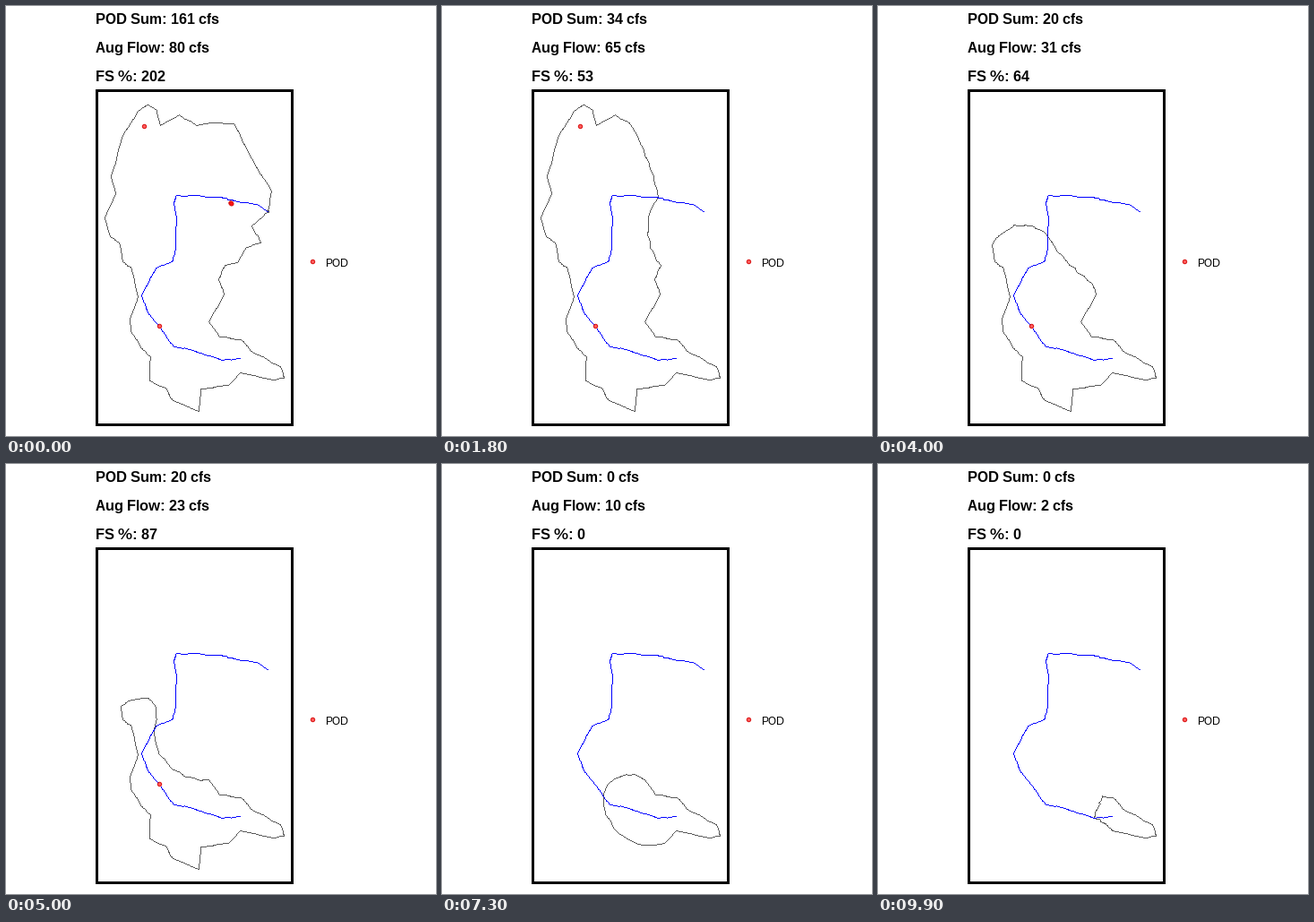
A matplotlib script for the animation above (10 s loop, 480x480 px).

```python
import matplotlib.pyplot as plt
import numpy as np
from matplotlib.animation import FuncAnimation
from matplotlib.patches import Circle, Rectangle

plt.rcParams["text.hinting"] = "default"
plt.rcParams["text.hinting_factor"] = 1

SIZE, FRAMES = 480, 100
PX = 0.72  # points per pixel at 100 dpi
rng = np.random.default_rng(7)

# Corners of the stream, from the lower end up to its source
RIVER = np.array([
    (292, 230), (278, 222), (250, 217), (240, 214), (190, 212), (187, 222),
    (190, 240), (189, 270), (185, 286), (167, 293), (151, 324), (157, 341),
    (187, 381), (205, 384), (241, 396), (261, 394)], float)

# Corners of the whole basin, counterclockwise from the stream's lower end
RIM = np.array([
    (292, 230), (296, 207), (281, 184), (272, 168), (254, 132), (233, 131),
    (212, 134), (193, 122), (172, 134), (168, 117), (158, 111), (147, 118),
    (130, 145), (117, 190), (122, 210), (110, 237), (116, 258), (126, 265),
    (130, 286), (139, 292), (147, 325), (138, 350), (139, 364), (150, 382),
    (161, 392), (160, 419), (178, 427), (186, 441), (215, 453), (217, 428),
    (248, 424), (261, 410), (298, 418), (310, 416), (306, 403), (276, 388),
    (262, 373), (238, 370), (226, 353), (243, 322), (237, 306), (244, 290),
    (258, 287), (268, 270), (284, 265), (274, 246), (292, 230)], float)

# frame, flow, outlet distance upstream, rim corner where the left and the
# right divide end, outward bow of each divide; neighbours one apart are jumps
KEYS = np.array([
    (0, 79.7, 0, 0, 46, 0, 0),
    (18, 64.6, 54, 6.2, 41, 4, -13),
    (30, 61, 101, 6.2, 41, 14, 14),
    (31, 41.7, 105, 15, 41, -4, 5),
    (33, 37, 115, 17, 41, 12, 7),
    (50, 23, 204, 17.3, 38, 25, -18),
    (54, 20, 229, 20, 38, 4, -8),
    (63, 16.8, 252, 21.2, 38, 4, 8),
    (72, 14, 285, 23.3, 38, 0, 14),
    (73, 10.2, 290, 30, 38, 22, 14),
    (83, 7, 319, 30, 38, 7, 8),
    (99, 2, 358, 31, 36.5, -2, 0)])

# x, y, flow, first frame without it
PODS = [(154, 134, 14, 31), (250.5, 219.5, 100, 15), (251.3, 220.3, 27, 15),
        (171, 357, 20, 68)]


def at(path, where, grid):
    return np.c_[np.interp(where, grid, path[:, 0]),
                 np.interp(where, grid, path[:, 1])]


def roughen(path, parts, amount):
    """Split each side and shake the new points; corners stay put."""
    u = np.arange((len(path) - 1) * parts + 1) / parts
    fine = at(path, u, np.arange(len(path)))
    shake = rng.uniform(-amount, amount, fine.shape)
    shake[::parts] = 0
    return u, fine + shake


def pixels(path):
    """Pixel centres along a polyline, one per step of its longer axis."""
    runs = []
    for a, b in zip(path[:-1], path[1:]):
        n = max(int(np.ceil(np.abs(b - a).max())), 1)
        runs.append(a + (b - a) * np.linspace(0, 1, n + 1)[:, None])
    return np.rint(np.vstack(runs)).T


def divide(outlet, end, bow, shake):
    d = end - outlet
    u = np.linspace(0, 1, len(shake))[:, None]
    normal = np.array([-d[1], d[0]]) / max(np.hypot(*d), 1)
    arch = np.sin(np.pi * u) ** 0.7
    return outlet + d * u + normal * bow * arch + shake * arch


RIVER_S = np.r_[0, np.cumsum(np.hypot(*np.diff(RIVER, axis=0).T))]
RIM_U, RIM_FINE = roughen(RIM, 3, 0.8)
SHAKE = rng.uniform(-1.5, 1.5, (2, 12, 2))


def basin(i):
    flow, s, u0, u1, bow0, bow1 = (
        np.interp(i, KEYS[:, 0], c) for c in KEYS[:, 1:].T)
    inner = RIM_U[(RIM_U > u0) & (RIM_U < u1)]
    rim = at(RIM_FINE, np.r_[u0, inner, u1], RIM_U)
    outlet = at(RIVER, s, RIVER_S)[0]
    left = divide(outlet, rim[0], bow0, SHAKE[0])
    right = divide(outlet, rim[-1], -bow1, SHAKE[1])
    return flow, np.vstack([left, rim, right[::-1]])


fig = plt.figure(figsize=(4.8, 4.8), dpi=100, facecolor="white")
ax = fig.add_axes([0, 0, 1, 1])
ax.set(xlim=(0, SIZE), ylim=(SIZE, 0))
ax.axis("off")


def label(x, y, px, **kw):
    return ax.text(x, y, "", family="Liberation Sans", size=px * PX,
                   va="baseline", **kw)


def trace(color, z):
    return ax.plot([], [], ",", color=color, zorder=z)[0]


def dot(x, y, fill=(1, 0.36, 0.36)):
    return ax.add_patch(Circle((x + 0.5, y + 0.5), 2.2, fc=fill,
                               ec=(0.85, 0.08, 0.08), lw=PX, zorder=4))


titles = [label(100, y, 16, weight="bold") for y in (20, 52, 84)]
label(356, 291, 12).set_text("POD")
ax.add_patch(Rectangle((101.5, 94.5), 218, 373, fill=False, ec="black",
                       lw=3 * PX, joinstyle="miter", snap=False, zorder=5))
edge = trace("#595959", 2)
trace("blue", 3).set_data(*pixels(roughen(RIVER, 6, 0.9)[1]))

shared = (1, 0.08, 0.08)  # overlapping points look solid
dots = [dot(x, y, shared) if x % 1 else dot(x, y) for x, y, _, _ in PODS]
dot(342, 285)


def update(i):
    flow, outline = basin(i)
    edge.set_data(*pixels(outline))
    total = 0
    for d, (_, _, q, gone) in zip(dots, PODS):
        d.set_visible(i < gone)
        total += q * (i < gone)
    titles[0].set_text(f"POD Sum: {total} cfs")
    titles[1].set_text(f"Aug Flow: {flow:.0f} cfs")
    titles[2].set_text(f"FS %: {100 * total / flow:.0f}")
    return [edge, *titles, *dots]


anim = FuncAnimation(fig, update, frames=FRAMES, interval=100, repeat=True,
                     repeat_delay=0, init_func=lambda: update(0))
plt.show()
```
